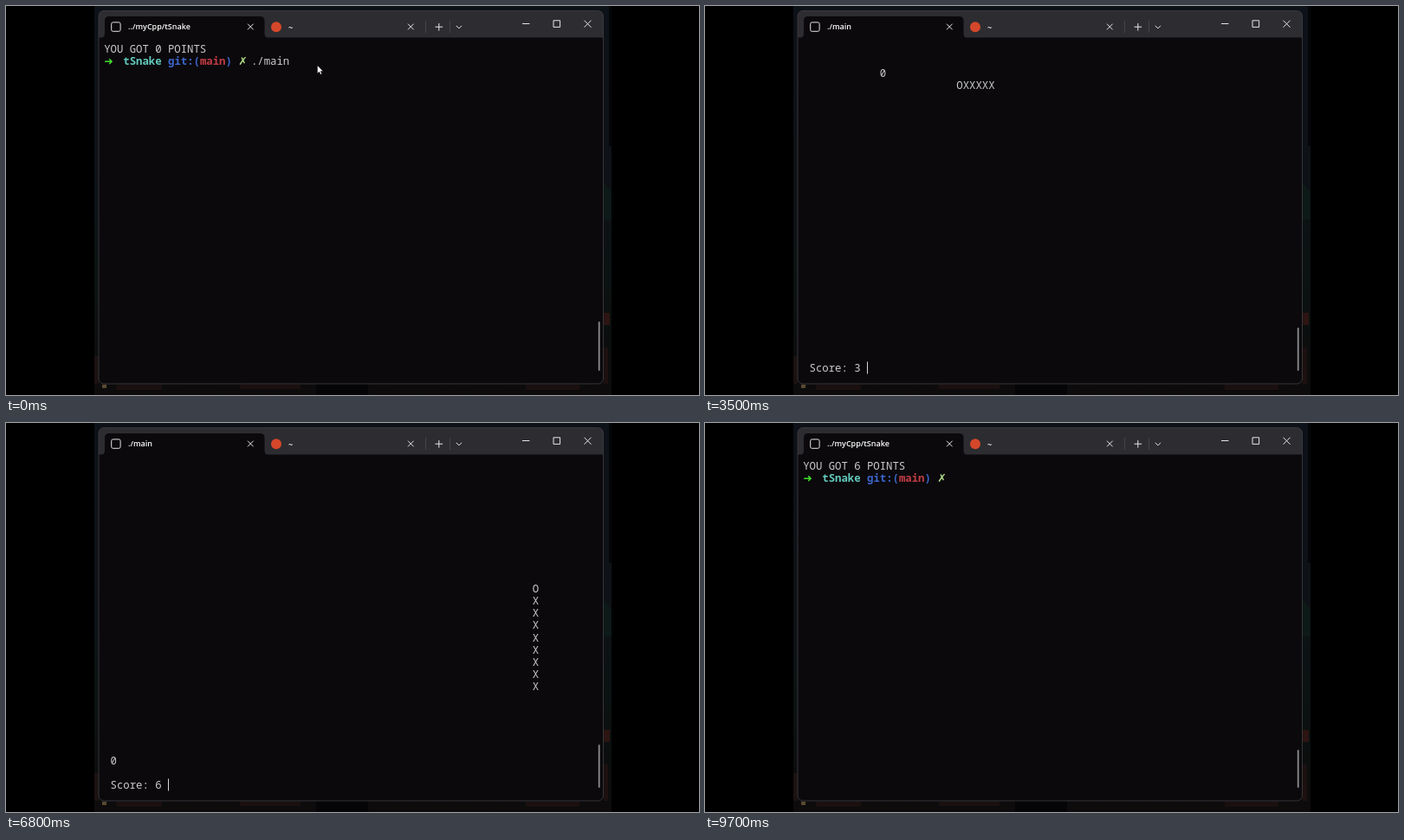
Recreate the animation shown at these times as an HTML page. Size 800 px wide and 450 px high, loop 9.8 s.

```html
<!DOCTYPE html>
<html lang="en">
<head>
<meta charset="utf-8">
<title>Terminal snake</title>
<style>
  html, body { margin: 0; width: 100%; height: 100%; overflow: hidden; background: #000; }
  svg { display: block; width: 800px; height: 450px; }
  text { white-space: pre; }
  .mono { font: 12.3px "Noto Sans Mono", "DejaVu Sans Mono", monospace; fill: #ccc; }
  .bold { font-weight: 700; }
  .sym { font-family: "DejaVu Sans", sans-serif; font-size: 12.5px; }
  .tab { font: 600 9px "Open Sans", "Noto Sans", sans-serif; fill: #fff; }
  .line { fill: none; stroke: #e6e6e6; stroke-width: 1; }
</style>
</head>
<body>
<svg viewBox="0 0 800 450">
  <defs>
    <linearGradient id="dusk" x2="0" y2="1">
      <stop offset="0" stop-color="#0d1118"/>
      <stop offset=".45" stop-color="#0e1217"/>
      <stop offset=".7" stop-color="#0b1211"/>
      <stop offset="1" stop-color="#0d0b0c"/>
    </linearGradient>
  </defs>
  <rect width="800" height="450"/>

  <!-- wallpaper -->
  <rect x="102" width="597" height="450" fill="url(#dusk)"/>
  <path d="M696 0h3v162h-3z" fill="#050609"/>
  <path d="M690 205l9 10v32h-9z" fill="#0d1a17"/>
  <path d="M690 355h7v14h-7z" fill="#2c1512"/>
  <path d="M690 395h5v42h-5z" fill="#1c1110"/>
  <path d="M102 405h5v32h-5z" fill="#1c1212"/>
  <path d="M128 438h52v6h-52zM270 438h70v5h-70zM600 438h62v6h-62z" fill="#1b1010"/>
  <path d="M358 437h60v13h-60z" fill="#050507"/>
  <path d="M111 438h5v4h-5z" fill="#584a31"/>

  <!-- window -->
  <rect x="107" y="5.5" width="582.5" height="431.5" rx="6" fill="#0b090c"/>
  <path d="M107 36.5V11.5a6 6 0 0 1 6-6H683.5a6 6 0 0 1 6 6V36.5z" fill="#2d2c30"/>
  <path d="M109 37q5 0 5-5V17q0-5 5-5H293q5.500 0 5.500 5V32q0 5 5 5z" fill="#0b090c"/>
  <rect x="107" y="5.500" width="582.500" height="431.500" rx="6" fill="none" stroke="#414044" stroke-width=".8"/>

  <rect class="line" x="121.700" y="18.900" width="10.400" height="10.400" rx="1.800"/>
  <text id="title" class="tab" x="141" y="27.300"></text>
  <circle cx="312" cy="24.200" r="6" fill="#d5472b"/>
  <text class="tab" x="326" y="27.800">~</text>
  <path class="line" d="M279 20.700l6.600 6.600m0-6.600l-6.600 6.600M464 20.700l6.600 6.600m0-6.600l-6.600 6.600"/>
  <path class="line" d="M484.500 17v14M512.500 17v14" style="stroke:#454449"/>
  <path class="line" d="M495.500 24.200h8.600M499.800 20v8.600M519.800 22.800l3.100 3.100 3.100-3.100M596 20.500h8.400M632 16.800h7.600v7.600h-7.600zM667.500 16.700l8 8m0-8l-8 8"/>

  <rect id="thumb" x="683.800" width="1.800" rx=".9" fill="#8c8b8e"/>
  <g id="screen" class="mono"></g>
  <path id="pointer" d="M359.500 68.700v9.300l2.100-1.900 1.500 3.200 1.500-.7-1.500-3.100h2.900z" fill="#fff" stroke="#000" stroke-width=".4"/>
</svg>
<script>
const LOOP = 9800, START = 700, END = 8900;
const COL = 7.38, ROW = 14.2, LEFT = 113.2, BASE = 53.7;
const $ = id => document.getElementById(id);

// corners of the snake's route, in cells
const corners = [[39,16],[39,9],[28,9],[28,14],[35,14],[35,3],[20,3],[20,2],
                 [7,2],[7,20],[67,20],[67,10],[66,10],[66,20],[1,20]];
const foods = [[34,9],[28,11],[31,14],[12,2],[55,20],[67,10],[1,24]];
// [time, cells travelled]
const pace = [[700,2],[1400,16],[1900,16],[2400,31],[3500,52],[4700,76],
              [5700,137],[7900,179],[8830,234]];

const path = [corners[0]];
for (const [cx, cy] of corners.slice(1)) {
  let [x, y] = path[path.length - 1];
  while (x !== cx || y !== cy) {
    x += Math.sign(cx - x);
    y += Math.sign(cy - y);
    path.push([x, y]);
  }
}

// cells travelled when each piece of food is eaten
let from = 0;
const meals = foods.map(([fx, fy]) => {
  const at = path.findIndex(([x, y], i) => i > from && x === fx && y === fy);
  if (at < 0) return Infinity;
  return from = at;
});

function travelled(t) {
  const i = pace.findIndex(p => p[0] > t);
  if (i < 0) return path.length - 1;
  const [t0, s0] = pace[i - 1], [t1, s1] = pace[i];
  return Math.floor(s0 + (s1 - s0) * (t - t0) / (t1 - t0) + 0.3);
}

const put = (col, row, str, color = "#ccc", cls = "") =>
  `<text x="${LEFT + col * COL}" y="${BASE + row * ROW}" class="${cls}" fill="${color}" style="fill:${color}">${str}</text>`;

function shell(points, command) {
  return put(0, 0, `YOU GOT ${points} POINTS`) +
    put(0, 1, "➜", "#3fe22c", "sym") +
    put(3, 1, "tSnake", "#62cbbd", "bold") +
    put(10, 1, "git:(", "#3d66cc", "bold") +
    put(15, 1, "main", "#c43c45", "bold") +
    put(19, 1, ")", "#3d66cc", "bold") +
    put(21, 1, "✗", "#b4e08c", "sym") +
    put(23, 1, command);
}

function game(t) {
  const head = travelled(t);
  const score = meals.filter(m => m <= head).length;
  const body = path.slice(Math.max(0, head - score - 2), head);
  return put(...foods[score], "0") +
    body.map(([x, y]) => put(x, y, "X")).join("") +
    put(...path[head], "O") +
    put(1, 26, `Score: ${score}`) +
    '<path d="M187.500 411.500v14" stroke="#d8d8d8"/>';
}

let shown = -1;
function draw(t) {
  if (t === shown) return;
  shown = t;
  const playing = t >= START && t < END;
  const top = t < START ? 365 : playing ? 372 : 378;
  $("title").textContent = playing ? "./main" : "../myCpp/tSnake";
  $("thumb").setAttribute("y", top);
  $("thumb").setAttribute("height", 422 - top);
  $("pointer").style.display = t < 400 ? "" : "none";
  $("screen").innerHTML = playing ? game(t) : t < START ? shell(0, "./main") : shell(6, "");
}

const begin = performance.now();
function tick() {
  const t = (performance.now() - begin) % LOOP;
  draw(Math.floor(t / 100) * 100);
  requestAnimationFrame(tick);
}
draw(0);
requestAnimationFrame(tick);
</script>
</body>
</html>
```
